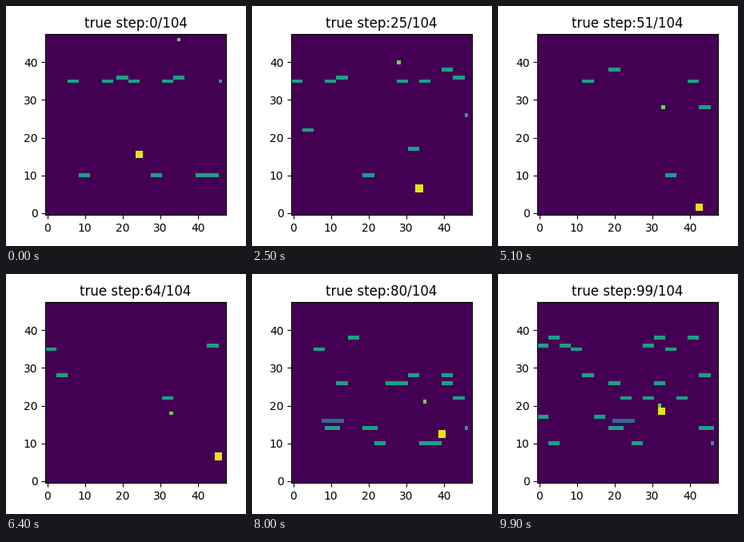
A matplotlib script that plays this animation: 300x300 px, repeating every 10 s.

```python
import random
import numpy as np
import matplotlib.pyplot as plt
from matplotlib.animation import FuncAnimation

SIZE, FRAMES, STEPS = 48, 100, 104
EDGE = 47                      # bars are cut off at this column
BLUE, TEAL, GREEN, YELLOW = 0.35, 0.56, 0.78, 0.96
DIAG = 0.355                   # per-axis speed of the yellow block
SPEED = 3.1                    # cells per step of a teal bar

LANES = [38, 36, 35, 26, 22, 17, 10]
LATE_LANES = LANES + [28, 14]  # more lanes open in the second half
WIDE_LANE = 14
SLOW_LANE, SLOW_SPEED, SLOW_START = 16, 0.63, 67


def traffic(t):
    """Chance per step of a new bar: steady, then a lull, then a rush."""
    return np.interp(t, [30, 36, 50, 64, 68], [0.75, 0.15, 0.4, 0.4, 1.2])


def spawn_bars(seed=4):
    """List of (entry step, lane) for every teal bar."""
    rng = random.Random(seed)
    bars = []
    for t in range(-18, FRAMES):
        lanes = LANES if t < 50 else LATE_LANES
        count = int(traffic(t) + rng.random())
        bars += [(t, row) for row in rng.sample(lanes, count)]
    return bars


BARS = spawn_bars()


def dot_pos(t):
    """Drifts down, hovers, dives, then turns up again."""
    times = [0, 15, 34, 51, 64, 80, 99]
    x = np.interp(t, times, [35, 28, 28, 33, 33, 35, 32])
    y = np.interp(t, times, [46, 39, 40, 28, 18, 21, 20])
    return int(round(x)), int(round(y))


def block_pos(t):
    """Diagonal run that rests briefly at the floor and at the right wall."""
    x = min(24.3 + DIAG * t, 45.9, 39.5 - DIAG * (t - 80))
    y = max(15.2 - DIAG * t, 0, 6.4 + DIAG * (t - 64))
    return int(x), int(y)


def draw_bar(grid, row, x, width, shade):
    if -2 < x < EDGE:
        x = max(x, 0)
        grid[row, x:min(x + width, EDGE)] = shade


def world(t):
    grid = np.zeros((SIZE, SIZE))
    x, y = dot_pos(t)
    grid[y, x] = GREEN
    x, y = block_pos(t)
    grid[y:y + 2, x:x + 2] = YELLOW
    for start, row in BARS:
        x = EDGE - 1 - int(SPEED * (t - start))
        if t >= start:
            draw_bar(grid, row, x, 4 if row == WIDE_LANE else 3, TEAL)
    if t >= SLOW_START:
        x = int(SLOW_SPEED * (t - SLOW_START))
        draw_bar(grid, SLOW_LANE, x, 6, BLUE)
    return grid


fig = plt.figure(figsize=(3, 3), dpi=100)
ax = fig.add_axes([0.164, 0.13, 0.753, 0.753])
image = ax.imshow(world(0), origin="lower", vmin=0, vmax=1, cmap="viridis")
title = ax.set_title(f"true step:0/{STEPS}")


def update(t):
    image.set_data(world(t))
    title.set_text(f"true step:{t}/{STEPS}")
    return image, title


anim = FuncAnimation(fig, update, frames=FRAMES, interval=100,
                     repeat=True, repeat_delay=0, blit=False)
plt.show()
```
